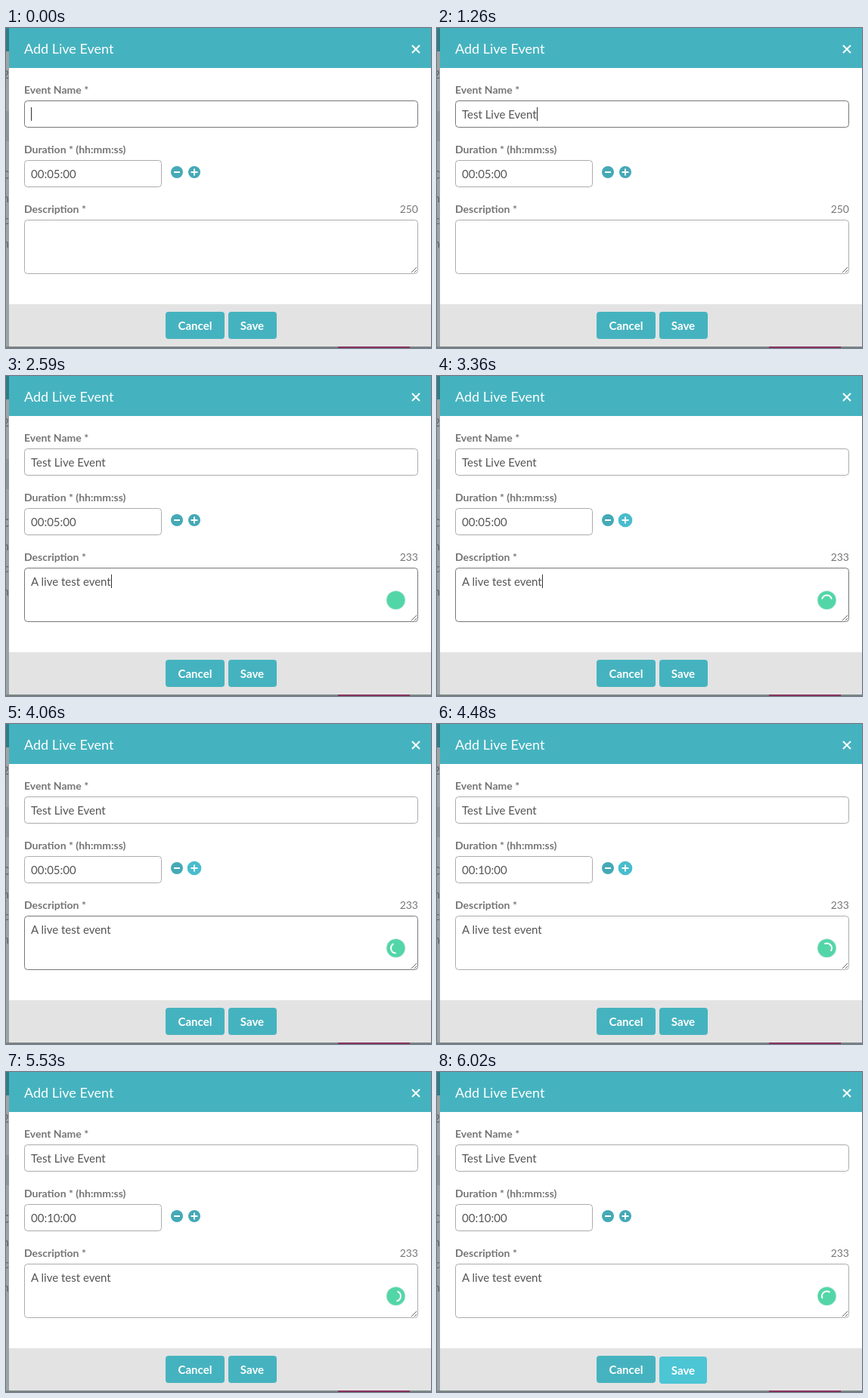
An HTML page that plays this animation: 562x424 px, repeating every 6.09 s.

```html
<!DOCTYPE html>
<html lang="en">
<head>
<meta charset="utf-8">
<title>Add Live Event</title>
<style>
  html, body { margin: 0; width: 100%; height: 100%; overflow: hidden; background: #fff; }
  svg { display: block; }
  text { font: 15px Lato, sans-serif; fill: #555; white-space: pre; }
  .title { font-size: 18px; fill: #fff; }
  .label { font-size: 14px; font-weight: 700; fill: #757575; }
  .count { font-size: 14px; fill: #777; text-anchor: end; }
  .button { font-weight: 700; fill: #fff; text-anchor: middle; }
  .behind { font-size: 16px; fill: #5d6566; text-anchor: end; }
  .field { fill: #fff; stroke: #acacac; }
  .field.focus { stroke: #777; }
  .white { fill: none; stroke: #fff; stroke-width: 2; }
</style>
</head>
<body>
<svg width="562" height="424" viewBox="0 0 562 424">
  <!-- dimmed page behind the dialog -->
  <rect width="562" height="424" fill="#9ba3a4"/>
  <rect width="5" height="31" fill="#2f7c86"/>
  <rect y="110" width="5" height="40" fill="#8d9596"/>
  <g>
    <text class="behind" x="4" y="67">2</text>
    <text class="behind" x="4" y="200">C</text>
    <text class="behind" x="4" y="231">n</text>
    <text class="behind" x="4" y="260">c</text>
    <text class="behind" x="4" y="291">n</text>
  </g>
  <rect y="422" width="562" height="2" fill="#7d8586"/>
  <rect x="439" y="422" width="95" height="2" fill="#86345f"/>

  <!-- dialog -->
  <rect x="4" width="558" height="422" fill="#fff"/>
  <rect x="4" width="558" height="53" fill="#45b3bf"/>
  <rect x="4" y="366" width="558" height="56" fill="#e3e3e3"/>
  <text class="title" x="24" y="34">Add Live Event</text>
  <path class="white" d="M537 23l10 10m0-10l-10 10"/>

  <text class="label" x="24" y="87">Event Name *</text>
  <rect id="nameBox" class="field" x="24.5" y="96.5" width="520" height="35" rx="4"/>
  <text id="name" x="33" y="120"></text>

  <text class="label" x="24" y="166">Duration * (hh:mm:ss)</text>
  <rect class="field" x="24.5" y="175.5" width="181" height="35" rx="4"/>
  <text id="duration" x="33" y="199"></text>
  <circle cx="226" cy="191" r="8" fill="#45a9b6"/>
  <path class="white" d="M222 191h8"/>
  <circle id="plus" cx="249" cy="191"/>
  <path class="white" d="M244.5 191h9m-4.5-4.5v9"/>

  <text class="label" x="24" y="245">Description *</text>
  <text id="count" class="count" x="545" y="245"></text>
  <rect id="descBox" class="field" x="24.5" y="254.5" width="520" height="71" rx="4"/>
  <path d="M536 324l7-7m-3 7l3-3" stroke="#666"/>
  <text id="desc" x="33" y="278"></text>

  <g id="badge">
    <circle cx="515.5" cy="297" r="13" fill="#dcefe9"/>
    <circle cx="515.5" cy="297" r="12" fill="#52d6a8"/>
    <path id="arc" class="white" d="M509.4 294.8A6.5 6.5 0 0 1 521.6 294.8" stroke-linecap="round"/>
  </g>
  <rect id="caret" width="1" height="18" fill="#333"/>

  <rect x="211" y="376" width="78" height="36" rx="4" fill="#45b3bf"/>
  <text class="button" x="250" y="400">Cancel</text>
  <rect id="save" x="294" height="36" rx="4"/>
  <text id="saveText" class="button" x="325.5">Save</text>
</svg>
<script>
const LOOP = 6090;
const $ = id => document.getElementById(id);
const set = (id, attrs) => {
  for (const key in attrs) $(id).setAttribute(key, attrs[key]);
};

const NAME = 'Test Live Event', DESC = 'A live test event';
const typing = [[70, 2], [140, 4], [210, 6], [280, 7], [350, 9], [420, 11], [560, 15]];
const spin = [[2590, -282], [3360, 0], [4480, 408], [5530, 815], [6090, 1072]];

// last step value reached at time t
const step = (keys, t) => keys.reduce((value, [at, v]) => t >= at ? v : value, 0);

function lerp(keys, t) {
  const i = Math.max(1, keys.findIndex(key => key[0] > t));
  const [t0, a] = keys[i - 1], [t1, b] = keys[i];
  return a + (b - a) * (t - t0) / (t1 - t0);
}

function draw(t) {
  const inName = t < 1750, inDesc = !inName && t < 4130;
  const desc = t < 2310 ? '' : DESC;
  $('name').textContent = NAME.slice(0, step(typing, t));
  $('desc').textContent = desc;
  $('count').textContent = 250 - desc.length;
  $('duration').textContent = t < 4130 ? '00:05:00' : '00:10:00';
  $('nameBox').classList.toggle('focus', inName);
  $('descBox').classList.toggle('focus', inDesc);

  const caretOn = inName ? t < 700 || t >= 1260
    : inDesc && (t < 2310 || (t - 2310) % 1000 < 500 || t >= 3310 && t < 3850);
  const active = $(inName ? 'name' : 'desc');
  const end = active.textContent ? active.getComputedTextLength() : 0;
  set('caret', {
    x: Math.round(33 + end),
    y: inName ? 105 : 263,
    opacity: +caretOn
  });

  const plusHover = t >= 3220 && t < 5040;
  set('plus', { r: plusHover ? 9.3 : 8, fill: plusHover ? '#48bdcd' : '#45a9b6' });

  set('badge', { opacity: t < 2100 ? 0 : t < 2170 ? 0.5 : 1 });
  set('arc', {
    opacity: Math.min(1, Math.max(0, (t - 2660) / 210)),
    transform: `rotate(${lerp(spin, Math.max(t, 2590))} 515.5 297)`
  });

  const saveHover = t >= 5880;
  set('save', {
    y: saveHover ? 377 : 376,
    width: saveHover ? 63 : 64,
    fill: saveHover ? '#4cc5d5' : '#45b3bf'
  });
  set('saveText', { y: saveHover ? 401 : 400 });
}

const start = performance.now();
function frame() {
  draw((performance.now() - start) % LOOP);
  requestAnimationFrame(frame);
}
frame();
</script>
</body>
</html>
```
